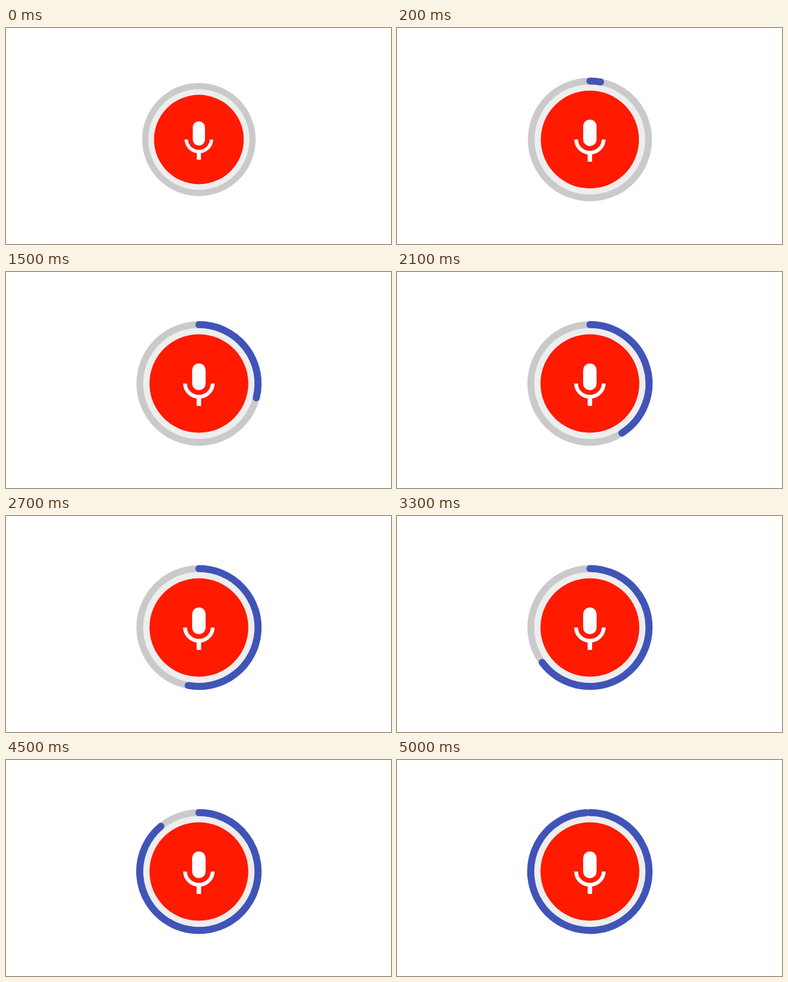
Write an HTML page that moves like this. It is 600 px wide and 338 px high and loops after 5100 ms.

```html
<!DOCTYPE html>
<html lang="en">
<head>
<meta charset="utf-8">
<title>Recording button</title>
<style>
  html, body { margin: 0; width: 100%; height: 100%; overflow: hidden; background: #fff; }
  svg { display: block; width: 100vw; height: 100vh; }
</style>
</head>
<body>
<svg viewBox="0 0 600 338">
  <g id="button">
    <circle r="97.4" fill="#cacaca"/>
    <circle r="86.8" fill="#eee"/>
    <path id="arc" fill="none" stroke="#4054b8" stroke-width="11" stroke-linecap="round"/>
    <circle r="77" fill="#ff1a00"/>
    <g transform="scale(3.5)" fill="#fff">
      <rect x="-3" y="-9" width="6" height="12" rx="3"/>
      <path d="M5.3 0C5.3 3 2.76 5.1 0 5.1S-5.3 3-5.3 0H-7C-7 3.41-4.28 6.23-1 6.72V10H1V6.72C4.28 6.24 7 3.42 7 0Z"/>
    </g>
  </g>
</svg>
<script>
const LOOP = 5100, STEP = 100, START = 55, SWEEP = 5000, GROW = 200;
const CX = 300.6, CY = 174.5, R = 92.2, REST = 0.908;
const button = document.getElementById('button');
const arc = document.getElementById('arc');

const clamp = x => Math.min(1, Math.max(0, x));
const easeOut = x => 1 - (1 - x) ** 2;

function arcPath(turn) {
  const a = turn * 2 * Math.PI;
  const x = (R * Math.sin(a)).toFixed(3), y = (-R * Math.cos(a)).toFixed(3);
  return `M0 ${-R}A${R} ${R} 0 ${turn > 0.5 ? 1 : 0} 1 ${x} ${y}`;
}

function draw(ms) {
  // The picture advances in tenths of a second.
  const t = Math.floor((ms % LOOP) / STEP) * STEP - START;
  const scale = REST + (1 - REST) * easeOut(clamp(t / GROW));
  button.setAttribute('transform', `translate(${CX} ${CY}) scale(${scale})`);
  arc.setAttribute('d', t > 0 ? arcPath(t / SWEEP) : '');
}

const begin = performance.now();
function tick(now) {
  draw(Math.max(0, now - begin));
  requestAnimationFrame(tick);
}
draw(0);
requestAnimationFrame(tick);
</script>
</body>
</html>
```
